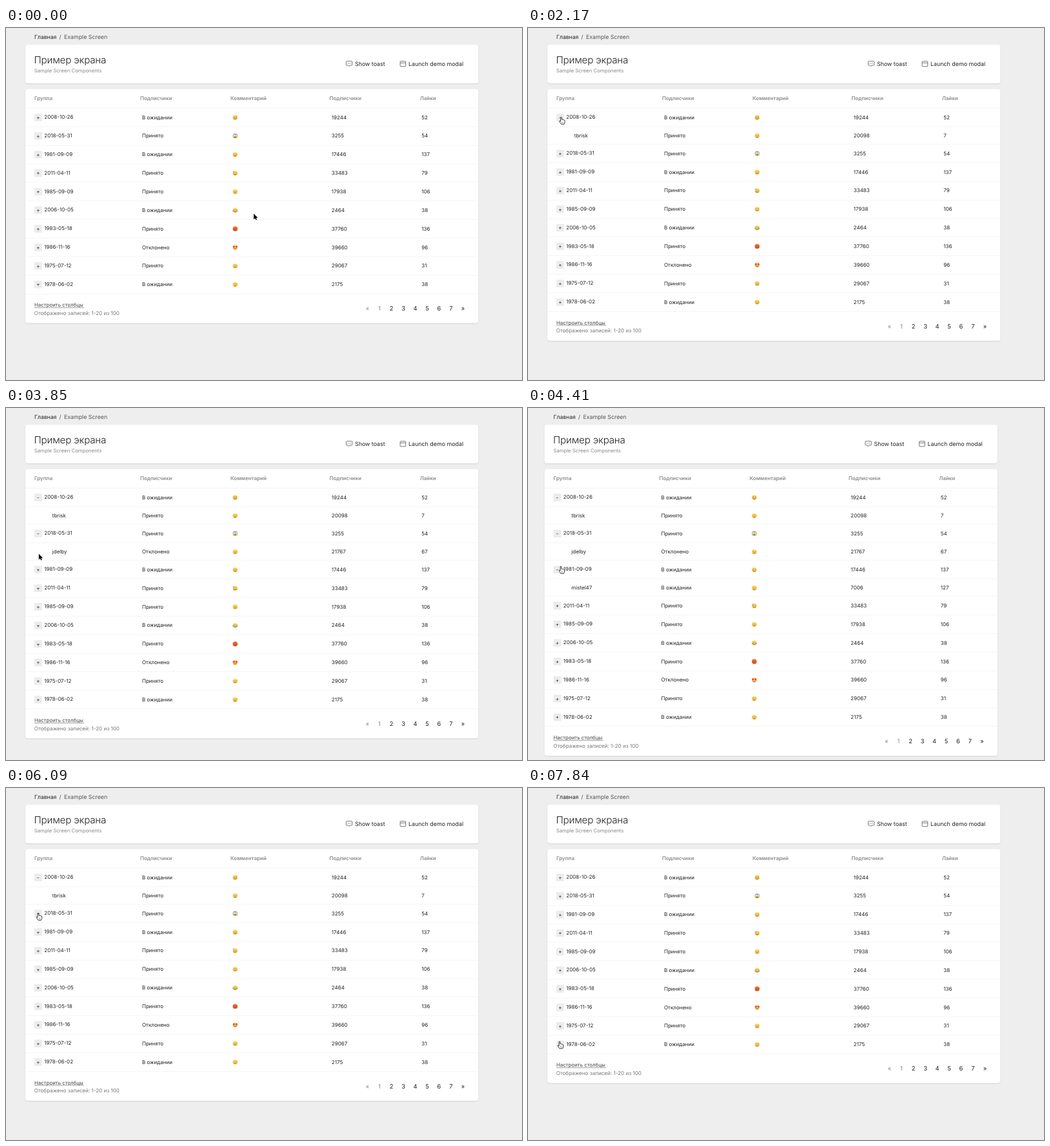
Recreate the animation shown at these times as an HTML page with a canvas. Size 800x547 px, loop 8 s.

```html
<!DOCTYPE html>
<html lang="ru">
<head>
<meta charset="utf-8">
<title>Пример экрана</title>
<style>
  html, body { margin: 0; width: 100%; height: 100%; overflow: hidden; background: #eee; }
  canvas { display: block; width: 800px; height: 547px; }
</style>
</head>
<body>
<canvas id="stage"></canvas>
<script>
const LOOP = 8000, STEP = 70;
const ROW_HEIGHT = 28.85, CHILD_HEIGHT = 27.3, TABLE_TOP = 124.6;
const canvas = document.getElementById('stage');
const ctx = canvas.getContext('2d');
const ratio = window.devicePixelRatio || 1;
canvas.width = 800 * ratio;
canvas.height = 547 * ratio;

const WAIT = 'В ожидании', OK = 'Принято', NO = 'Отклонено';
const entry = (name, status, mood, followers, likes, extra) =>
  ({ name, status, mood, followers, likes, ...extra });

// press: the button sign flips; open / close: the child row appears and goes
const groups = [
  entry('2008-10-26', WAIT, 'grin', 19244, 52,
    { press: 1540, open: 2100, close: 6930, child: entry('tbrisk', OK, 'flat', 20098, 7) }),
  entry('2018-05-31', OK, 'scream', 3255, 54,
    { press: 3290, open: 3290, close: 6090, child: entry('jdelby', NO, 'smirk', 21767, 67) }),
  entry('1981-09-09', WAIT, 'smile', 17446, 137,
    { press: 4270, open: 4410, close: 5320, child: entry('mistel47', WAIT, 'sad', 7006, 127) }),
  entry('2011-04-11', OK, 'sweat', 33483, 79),
  entry('1985-09-09', OK, 'smirk', 17938, 106),
  entry('2006-10-05', WAIT, 'joy', 2464, 38),
  entry('1983-05-18', OK, 'angry', 37760, 136),
  entry('1986-11-16', NO, 'love', 39660, 96),
  entry('1975-07-12', OK, 'sad', 29067, 31),
  entry('1978-06-02', WAIT, 'flat', 2175, 38),
];

// Pointer stops: time, x, y
const stops = [
  [0, 384, 288.5], [420, 82, 421], [630, 82, 421], [980, 50.5, 137.5],
  [1260, 50.5, 137.5], [1330, 51.5, 138], [2590, 51.5, 138], [3150, 50.5, 191.5],
  [3640, 50.5, 191.5], [3990, 51, 245.8], [4970, 51, 245.8], [5110, 50, 249],
  [5390, 50, 249], [5950, 50, 194], [6230, 50, 194], [6790, 50.5, 138.8],
  [7070, 50.5, 138.8], [7840, 49, 393.5], [LOOP, 49, 393.5],
];
const arrow = new Path2D('M0 0V9L2.1 7.1L3.5 10L5 9.3L3.7 6.5H6.4Z');
const hand = new Path2D('M-.9 .8Q0-.5 .9 .8V4.2Q2 3.6 2.6 4.6Q3.7 4 4.2 5Q5.4 4.7 5.6 6.1V8.4' +
  'Q5.4 9.8 4.5 11.4H0L-2.7 7.6Q-3.2 6.2-2.1 6.1L-.9 7.2Z');

function text(str, x, y, size = 8, color = '#222', { weight = 400, align = 'left', spacing = 0 } = {}) {
  ctx.font = `${weight} ${size}px Inter, "Open Sans", sans-serif`;
  ctx.textAlign = align;
  ctx.letterSpacing = spacing + 'px';
  ctx.fillStyle = color;
  ctx.fillText(str, x, y);
}

function rect(x, y, w, h, color) {
  ctx.fillStyle = color;
  ctx.fillRect(x, y, w, h);
}

function card(top, bottom) {
  ctx.save();
  ctx.shadowColor = 'rgba(0,0,0,.11)';
  ctx.shadowBlur = 2 * ratio;
  ctx.shadowOffsetY = ratio;
  ctx.fillStyle = '#fff';
  ctx.beginPath();
  ctx.roundRect(30, top, 702.3, bottom - top, 4);
  ctx.fill();
  ctx.restore();
}

function disc(x, y, r, color) {
  ctx.fillStyle = color;
  ctx.beginPath();
  ctx.arc(x, y, r, 0, 7);
  ctx.fill();
}

function face(mood, x, y) {
  const red = mood === 'angry';
  const fill = ctx.createLinearGradient(0, y - 4, 0, y + 4);
  fill.addColorStop(0, mood === 'scream' ? '#7ba6d8' : red ? '#f0803c' : '#ffe27a');
  fill.addColorStop(1, red ? '#d8402a' : '#f0b040');
  disc(x, y, 3.8, fill);

  const ink = '#8a5f22', happy = ['grin', 'smile', 'sweat', 'joy', 'love'].includes(mood);
  for (const side of [-1, 1]) {
    if (mood === 'love') disc(x + side * 2, y - 1.2, 1.5, '#e5404a');
    else if (mood === 'scream') disc(x + side * 1.5, y - .6, 1.1, '#fff');
    else rect(x + side * 1.6 - .6, y - 1.2, 1.2, mood === 'grin' ? 1.2 : .7, ink);
    if (mood === 'joy') disc(x + side * 3, y + 1, 1, '#65b2e6');
    if (mood === 'scream') rect(x + side * 2.9 - .7, y, 1.4, 3.4, '#f2c75a');
  }
  if (mood === 'sweat') disc(x - 2.6, y - 2.2, 1, '#77bfea');
  if (mood === 'scream') return disc(x, y + 2, 1, ink);

  ctx.strokeStyle = ink;
  ctx.lineWidth = .7;
  ctx.beginPath();
  if (happy) ctx.arc(x, y + .6, 1.9, .2, Math.PI - .2);
  else if (red || mood === 'sad') ctx.arc(x, y + 3, 1.5, Math.PI + .3, -.3);
  else { ctx.moveTo(x - 1.3, y + 1.9); ctx.lineTo(x + 1.5, y + (mood === 'smirk' ? 1.4 : 1.9)); }
  ctx.stroke();
}

function icons() {
  ctx.strokeStyle = '#555';
  ctx.lineWidth = .8;
  ctx.stroke(new Path2D('M528.6 51.6H535.6Q536.8 51.6 536.8 52.8V56.8Q536.8 58 535.6 58H533.2' +
    'L531.8 59.6L530.6 58H528.6Q527.4 58 527.4 56.8V52.8Q527.4 51.6 528.6 51.6Z'));
  for (const x of [529.9, 532.1, 534.3]) disc(x, 54.8, .6, '#555');
  ctx.stroke(new Path2D('M611.9 51.7H618.9Q619.7 51.7 619.7 52.5V59Q619.7 59.8 618.9 59.8H611.9' +
    'Q611.1 59.8 611.1 59V52.5Q611.1 51.7 611.9 51.7ZM611.1 54.2H619.7'));
}

function header() {
  text('Главная', 44, 17.2, 8.6, '#222');
  text('/', 82.5, 17.2, 8.6, '#555');
  text('Example Screen', 90, 17.2, 8.8, '#555');
  card(26, 86);
  text('Пример экрана', 43.5, 54.8, 15.2, '#222', { weight: 300, spacing: -.2 });
  text('Sample Screen Components', 43.7, 68.7, 7.8, '#888');
  icons();
  text('Show toast', 541, 59, 8.9);
  text('Launch demo modal', 624, 59, 8.9);
}

function layout(t) {
  let y = TABLE_TOP;
  const rows = [];
  for (const g of groups) {
    rows.push({ ...g, y, height: ROW_HEIGHT, sign: t >= g.press && t < g.close ? '-' : '+' });
    y += ROW_HEIGHT;
    if (t >= g.open && t < g.close) {
      rows.push({ ...g.child, y, height: CHILD_HEIGHT });
      y += CHILD_HEIGHT;
    }
  }
  return { rows, bottom: y };
}

function table({ rows, bottom }) {
  card(95, bottom + 45.5);
  const heads = [['Группа', 44], ['Подписчики', 208], ['Комментарий', 348], ['Подписчики', 501.5], ['Лайки', 641.7]];
  for (const [label, x] of heads) text(label, x, 112.2, 8, '#8c8c8c', { weight: 600 });
  rect(30, 124, 702, 1, '#f3f3f3');

  for (const row of rows) {
    const base = row.y + (row.sign ? 17 : 16.6);
    rect(30, Math.round(row.y + row.height - .6), 702, 1, '#f6f6f6');
    if (row.sign) {
      rect(44, row.y + 8.4, 11.8, 11.8, '#ececec');
      text(row.sign, 49.9, row.y + 17.2, 8, '#222', { align: 'center' });
    }
    text(row.name, row.sign ? 59.3 : 71.8, row.y + 16.5);
    text(row.status, 211, base);
    face(row.mood, 355.3, base - 2.7);
    text(row.followers, 504.8, base);
    text(row.likes, 644.3, base);
  }

  text('Настроить столбцы', 44, bottom + 20.3, 7.9, '#444');
  rect(44, bottom + 21.3, 77, .7, '#777');
  text('Отображено записей: 1-20 из 100', 43.7, bottom + 33, 8.08, '#777');
  [...'«1234567»'].forEach((mark, i) =>
    text(mark, 560.5 + i * 18.5, bottom + 26.3, 9.3, i < 2 ? '#888' : '#222', { align: 'center' }));
}

function pointerAt(t) {
  const i = stops.findIndex(([time]) => time > t);
  const [t0, x0, y0] = stops[i - 1], [t1, x1, y1] = stops[i];
  const p = (t - t0) / (t1 - t0), eased = p * p * (3 - 2 * p);
  return [x0 + (x1 - x0) * eased, y0 + (y1 - y0) * eased];
}

function pointer(t, rows, shift) {
  const [x, y] = pointerAt(t);
  const overButton = x > 44 + shift && x < 56 + shift &&
    rows.some(row => row.sign && y > row.y + 7 && y < row.y + 21);
  ctx.save();
  ctx.translate(x, y);
  ctx.lineJoin = 'round';
  if (overButton) {
    ctx.lineWidth = .9;
    ctx.strokeStyle = '#222';
    ctx.fillStyle = '#fff';
    ctx.fill(hand);
    ctx.stroke(hand);
    for (const finger of [1, 2.7]) rect(finger, 7.6, .6, 2.3, '#666');
  } else {
    ctx.lineWidth = 1;
    ctx.strokeStyle = '#fff';
    ctx.fillStyle = '#000';
    ctx.stroke(arrow);
    ctx.fill(arrow);
  }
  ctx.restore();
}

function draw(now) {
  const t = Math.floor((now % LOOP) / STEP) * STEP;
  const page = layout(t);
  // A page taller than the window gains a scrollbar, which moves the centred content
  const shift = page.bottom + 45.5 > 530 ? -4.5 : 0;
  ctx.setTransform(ratio, 0, 0, ratio, 0, 0);
  ctx.textRendering = 'geometricPrecision';
  rect(0, 0, 800, 547, '#eee');
  ctx.save();
  ctx.translate(shift, 0);
  header();
  table(page);
  ctx.restore();
  pointer(t, page.rows, shift);
}

const start = performance.now();
function tick() {
  draw(performance.now() - start);
  requestAnimationFrame(tick);
}
tick();
</script>
</body>
</html>
```
